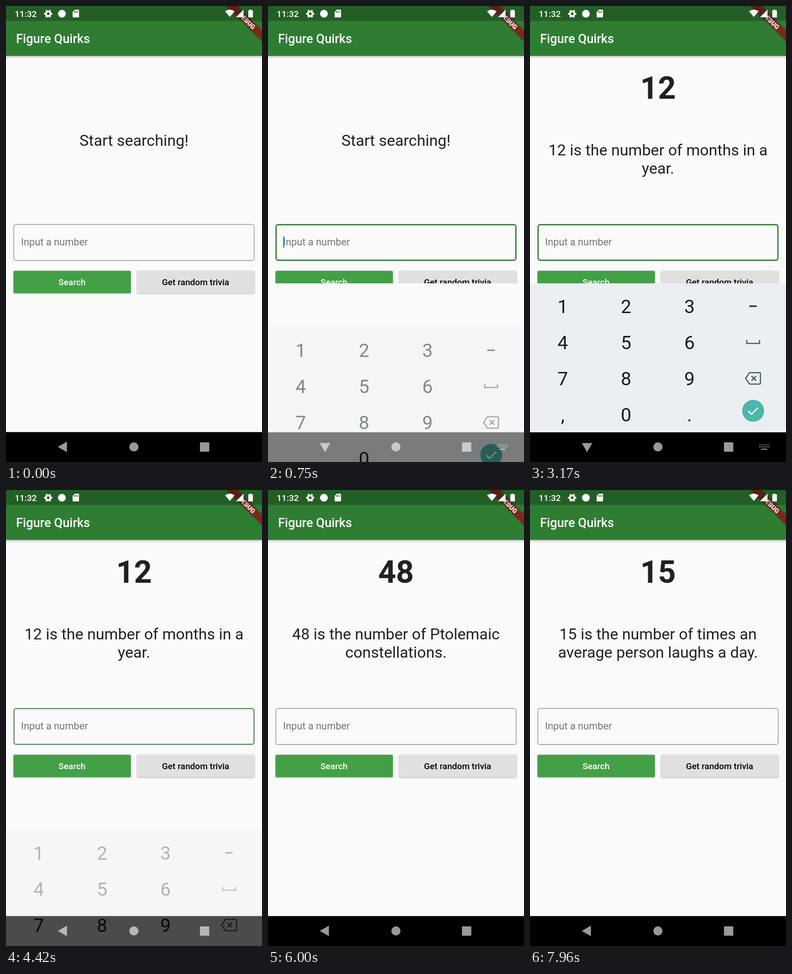
An HTML page for the animation above (8 s loop, 561 by 998 pixels).

```html
<!DOCTYPE html>
<html lang="en">
<head>
<meta charset="utf-8">
<title>Figure Quirks</title>
<style>
  html, body { margin: 0; width: 100%; height: 100%; overflow: hidden; background: #000; }
  svg { display: block; width: 100vw; height: 100vh; font-family: Roboto, sans-serif; }

  .mid { text-anchor: middle; }
  .fact { font-size: 34.09px; fill: #212121; text-anchor: middle; }
  .big { font-size: 68.2px; font-weight: 700; }
  .field { font-size: 21.82px; fill: #212121; }
  .button { font-size: 19.09px; font-weight: 500; text-anchor: middle; }
  .raised { filter: drop-shadow(0 1.5px 1.5px rgba(0, 0, 0, .3)); }
  .bar { fill: #2e7d32; filter: drop-shadow(0 2.5px 2.5px rgba(0, 0, 0, .28)); }
  .line { fill: none; stroke: #4a5b63; stroke-width: 2.6; }

  /* One 8 s loop: 1% is 80 ms */
  .step { opacity: 0; animation: 8s step-end infinite; }
  .welcome { animation-name: welcome; }
  .twelve { animation-name: twelve; }
  .fortyeight { animation-name: fortyeight; }
  .fifteen { animation-name: fifteen; }
  .hint { animation-name: hint; }
  .typed1 { animation-name: typed1; }
  .typed2 { animation-name: typed2; }
  .cursor { animation-name: cursor; }
  .ime { animation-name: ime; }
  .no-ime { animation-name: no-ime; }

  @keyframes welcome { 0% { opacity: 1 } 28.75%, 100% { opacity: 0 } }
  @keyframes twelve { 0% { opacity: 0 } 36.875% { opacity: 1 } 58.79%, 100% { opacity: 0 } }
  @keyframes fortyeight { 0% { opacity: 0 } 66.91% { opacity: 1 } 89.84%, 100% { opacity: 0 } }
  @keyframes fifteen { 0% { opacity: 0 } 97.96%, 100% { opacity: 1 } }
  @keyframes hint { 0% { opacity: 1 } 15.625% { opacity: 0 } 28.75%, 100% { opacity: 1 } }
  @keyframes typed1 { 0% { opacity: 0 } 15.625% { opacity: 1 } 20%, 100% { opacity: 0 } }
  @keyframes typed2 { 0% { opacity: 0 } 20% { opacity: 1 } 28.75%, 100% { opacity: 0 } }
  @keyframes ime { 0% { opacity: 0 } 8.125% { opacity: 1 } 54.375%, 100% { opacity: 0 } }
  @keyframes no-ime { 0% { opacity: 1 } 8.125% { opacity: 0 } 54.375%, 100% { opacity: 1 } }
  @keyframes cursor {
    0% { opacity: 0; transform: none }
    5% { opacity: 1; transform: none }
    11.25% { opacity: 0; transform: none }
    15.625% { opacity: 1; transform: translateX(12.3px) }
    20% { opacity: 1; transform: translateX(24.2px) }
    26.25% { opacity: 0; transform: none }
    28.75% { opacity: 1; transform: none }
    35% { opacity: 0; transform: none }
    41.25% { opacity: 1; transform: none }
    47.5%, 100% { opacity: 0; transform: none }
  }

  /* The clip keeps only the inner half of the stroke */
  .outline { fill: none; animation: focus 8s linear infinite; }
  @keyframes focus {
    0%, 5%, 56.875%, 100% { stroke: #8c8c8c; stroke-width: 2.73px }
    7.5%, 54.375% { stroke: #2e7d32; stroke-width: 5.45px }
  }

  .keyboard { animation: slide 8s cubic-bezier(.25, .46, .45, .94) infinite; }
  @keyframes slide {
    0%, 8.66%, 56.5%, 100% { transform: translateY(200px); opacity: 0 }
    11.16%, 54.375% { transform: none; opacity: 1 }
  }

  /* Loading ring and tap ripple share a start time */
  .spinner {
    fill: none; stroke: #43a047; stroke-width: 5.45; stroke-linecap: square;
    transform-origin: 280.5px 295px; opacity: 0;
    animation: loading 8s step-end infinite, turn 8s linear infinite, sweep 8s cubic-bezier(.4, 0, .2, 1) infinite;
    animation-delay: calc(var(--start) - 8s);
  }
  @keyframes loading { 0% { opacity: 1 } 8.125%, 100% { opacity: 0 } }
  @keyframes turn { 0% { transform: rotate(-90deg) } 8.333%, 100% { transform: rotate(63deg) } }
  @keyframes sweep { 0% { stroke-dasharray: .1 360 } 8.333%, 100% { stroke-dasharray: 270 360 } }

  .ripple {
    transform-origin: 432px 607px; opacity: 0;
    animation: ripple 8s linear infinite;
    animation-delay: calc(var(--start) - 8.087s);
  }
  @keyframes ripple {
    0% { transform: scale(0); opacity: .14 }
    .5% { transform: scale(.04); opacity: .14 }
    2.5% { transform: scale(.8); opacity: .1 }
    4.2%, 100% { transform: scale(1); opacity: 0 }
  }
</style>
</head>
<body>
<svg viewBox="0 0 561 998">
  <defs>
    <clipPath id="screen"><rect width="561" height="932.6"/></clipPath>
    <clipPath id="input"><rect x="16.4" y="477.3" width="528.2" height="80.4" rx="5.45"/></clipPath>
    <clipPath id="random"><rect x="287.3" y="579.5" width="257.3" height="49.1" rx="2.7"/></clipPath>
  </defs>

  <g clip-path="url(#screen)">
    <rect width="561" height="933" fill="#fafafa"/>

    <text class="fact step welcome" x="280.5" y="306">Start searching!</text>
    <g class="fact step twelve">
      <text class="big" x="280.5" y="203">12</text>
      <text x="280.5" y="327">12 is the number of months in a</text>
      <text x="280.5" y="367">year.</text>
    </g>
    <g class="fact step fortyeight">
      <text class="big" x="280.5" y="203">48</text>
      <text x="280.5" y="327">48 is the number of Ptolemaic</text>
      <text x="280.5" y="367">constellations.</text>
    </g>
    <g class="fact step fifteen">
      <text class="big" x="280.5" y="203">15</text>
      <text x="280.5" y="327">15 is the number of times an</text>
      <text x="280.5" y="367">average person laughs a day.</text>
    </g>
    <circle class="spinner" style="--start:2.3s" cx="280.5" cy="295" r="24.5" pathLength="360"/>
    <circle class="spinner" style="--start:4.703s" cx="280.5" cy="295" r="24.5" pathLength="360"/>
    <circle class="spinner" style="--start:7.187s" cx="280.5" cy="295" r="24.5" pathLength="360"/>

    <rect class="outline" x="16.4" y="477.3" width="528.2" height="80.4" rx="5.45" clip-path="url(#input)"/>
    <g class="field">
      <text class="step hint" x="33" y="523.5" fill="#747474">Input a number</text>
      <text class="step typed1" x="33" y="523.5">1</text>
      <text class="step typed2" x="33" y="523.5">12</text>
    </g>
    <rect class="step cursor" x="33" y="503.5" width="2.7" height="25.5" fill="#4285f4"/>

    <g class="button">
      <rect class="raised" x="16.4" y="579.5" width="257.3" height="49.1" rx="2.7" fill="#43a047"/>
      <text x="144.7" y="611" fill="#fff">Search</text>
      <rect class="raised" x="287.3" y="579.5" width="257.3" height="49.1" rx="2.7" fill="#e0e0e0"/>
      <g clip-path="url(#random)">
        <circle class="ripple" style="--start:4.703s" cx="432" cy="607" r="200"/>
        <circle class="ripple" style="--start:7.187s" cx="432" cy="607" r="200"/>
      </g>
      <text x="415.5" y="611">Get random trivia</text>
    </g>

    <rect class="bar" x="-10" y="-10" width="581" height="119.1"/>
    <text x="22" y="81" font-size="27.27" font-weight="500" fill="#fff">Figure Quirks</text>

    <g transform="translate(561 0) rotate(45)">
      <rect x="-55" y="38.2" width="110" height="16.4" fill-opacity=".5" style="filter:blur(1.5px)"/>
      <rect x="-55" y="38.2" width="110" height="16.4" fill="#b71c1c" fill-opacity=".63"/>
      <text class="mid" y="51.4" font-size="13.9" font-weight="900" fill="#fff">DEBUG</text>
    </g>
    <rect width="561" height="32.7" fill-opacity=".25"/>
    <rect class="step ime" y="607" width="561" height="326" fill="#fafafa"/>
  </g>

  <g fill="#fff">
    <text x="19" y="24" font-size="19.1" font-weight="500">11:32</text>
    <g fill="none" stroke="#fff">
      <circle cx="92.5" cy="17" r="5" stroke-width="4"/>
      <circle cx="92.5" cy="17" r="7.5" stroke-width="3" pathLength="12" stroke-dasharray="1 1" stroke-dashoffset=".5"/>
    </g>
    <circle cx="122.5" cy="17" r="8.5"/>
    <path d="M151 8h7.500q1.500 0 1.500 1.500v14q0 1.500 -1.500 1.500h-11q-1.500 0 -1.500 -1.500v-10.500z"/>
    <path d="M150 11v4m3.300-4v4m3.300-4v4" stroke="#225e25" stroke-width="1.6"/>
    <path d="M490.500 24L480 11.500Q490.500 4.500 501 11.500z"/>
    <path d="M504 24.500L520.500 8V24.500z"/>
    <path d="M533.500 9.500V8h4.500v1.500h3V25h-10V9.500z"/>
  </g>

  <g class="keyboard">
    <rect y="607" width="561" height="325.6" fill="#eceff1"/>
    <g class="mid" font-size="41" fill="#0a1f28">
      <text y="672"><tspan x="71.7">1</tspan><tspan x="210.5">2</tspan><tspan x="349.5">3</tspan></text>
      <text y="751"><tspan x="71.7">4</tspan><tspan x="210.5">5</tspan><tspan x="349.5">6</tspan></text>
      <text y="830"><tspan x="71.7">7</tspan><tspan x="210.5">8</tspan><tspan x="349.5">9</tspan></text>
      <text y="909"><tspan x="71.7">,</tspan><tspan x="210.5">0</tspan><tspan x="349.5">.</tspan></text>
      <rect x="480.500" y="655.500" width="16.500" height="3"/>
    </g>
    <path class="line" d="M475 731v7.500h28v-7.500"/>
    <path class="line" d="M481 802.500h22q2 0 2 2v21q0 2 -2 2h-22l-8.500-12.500zM485.500 810l10 10m0-10l-10 10"/>
    <circle cx="489" cy="886" r="24" fill="#4db6ac"/>
    <path d="M478.500 886.500l7 7l14-14" fill="none" stroke="#fff" stroke-width="2.7"/>
  </g>

  <g fill="#fff" opacity=".6">
    <path class="step no-ime" d="M113.500 965L133.500 953.500V976.500z"/>
    <path class="step ime" d="M113.500 956.500H136.500L125 976.500z"/>
    <circle cx="280.300" cy="965" r="10"/>
    <rect x="425" y="955" width="20.500" height="20.500" rx="1.500"/>
    <g class="step ime" fill="none" stroke="#fff" stroke-width="2.200">
      <path d="M502.500 960.500h22M502.500 965h22" stroke-dasharray="2.200 1.760"/>
      <path d="M507 970h13"/>
    </g>
  </g>
</svg>
</body>
</html>
```
